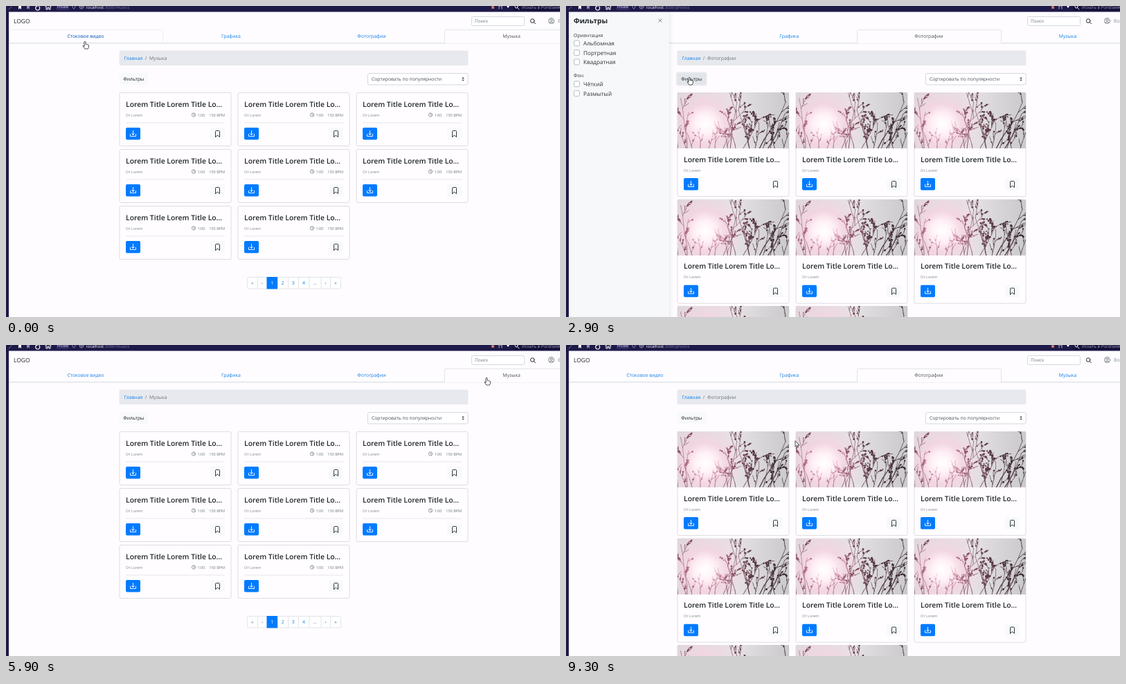
An HTML page with a canvas for the animation above (9.4 s loop, 800 by 450 pixels).

```html
<!DOCTYPE html>
<html lang="ru">
<head>
<meta charset="utf-8">
<style>
html, body { margin: 0; width: 100%; height: 100%; overflow: hidden; background: #fefcff; }
canvas { display: block; width: 800px; height: 450px; }
</style>
</head>
<body>
<canvas id="stage" width="800" height="450"></canvas>
<script>
const LOOP = 9400, STEP = 100;
const BLUE = '#007bff', INK = '#212529', GRAY = '#6c757d', LINE = '#e2e4e9', BODY = 6.86;
const ctx = document.getElementById('stage').getContext('2d');
ctx.textRendering = 'geometricPrecision';

const PAGES = {
  music: { tab: 3, url: 'musics', name: 'Музыка', edges: [4, 226, 423, 633, 827] },
  graphics: { tab: 1, url: 'graphics', name: 'Графика', edges: [4, 225, 420, 628, 821] },
  photos: { tab: 2, url: 'photos', name: 'Фотографии', edges: [4, 225, 420, 628, 821] }
};
const VISITS = [[0, 'music'], [700, 'graphics'], [1800, 'photos'], [5800, 'music'], [7800, 'photos']];
const TABS = ['Стоковое видео', 'Графика', 'Фотографии', 'Музыка'];

// Pointer tip: time, x, y
const POINTER = [
  [0, 114, 51], [100, 114, 51], [600, 322, 44], [1000, 322, 44], [1600, 492, 41], [1700, 505, 45],
  [1900, 505, 45], [2400, 178, 103], [2900, 178, 103], [3400, 32, 54], [3800, 32, 54], [4000, 40, 66],
  [4200, 32, 54], [4400, 32, 54], [4900, 178, 103], [5000, 180, 104], [5100, 236, 106], [5500, 690, 47],
  [5900, 694, 47], [6300, 560, 250], [6600, 400, 400], [6700, 400, 400], [7000, 600, 104],
  [7200, 600, 104], [7500, 532, 45], [7800, 532, 45], [8500, 480, 330], [8900, 300, 300], [9300, 331, 139]
];

function box(x, y, w, h, r, fill, stroke) {
  ctx.beginPath();
  ctx.roundRect(x, y, w, h, r);
  if (fill) { ctx.fillStyle = fill; ctx.fill(); }
  if (stroke) { ctx.strokeStyle = stroke; ctx.lineWidth = 1; ctx.stroke(); }
}

// y is the middle of the capitals
function text(s, x, y, size, color, align = 'left', weight = 400) {
  ctx.font = `${weight} ${size}px "Open Sans", "Noto Sans", sans-serif`;
  ctx.textAlign = align;
  ctx.fillStyle = color;
  ctx.fillText(s, x, y + size * .36);
}

function icon(d, x, y, stroke, width = 1, fill) {
  const path = new Path2D(d);
  ctx.save();
  ctx.translate(x, y);
  ctx.lineWidth = width;
  ctx.lineCap = ctx.lineJoin = 'round';
  if (fill) { ctx.fillStyle = fill; ctx.fill(path); }
  if (stroke) { ctx.strokeStyle = stroke; ctx.stroke(path); }
  ctx.restore();
}

function makePhoto() {
  const photo = document.createElement('canvas');
  photo.width = 161; photo.height = 81;
  const c = photo.getContext('2d');
  let seed = 11;
  const rnd = () => (seed = seed * 16807 % 2147483647) / 2147483647;
  const radial = (r, ...stops) => {
    const g = c.createRadialGradient(40, 46, 0, 40, 46, r);
    stops.forEach(([at, color]) => g.addColorStop(at, color));
    return g;
  };
  const paint = fill => { c.fillStyle = fill; c.fillRect(0, 0, 161, 81); };
  const sky = c.createLinearGradient(0, 0, 161, 0);
  sky.addColorStop(0, '#dfd6db'); sky.addColorStop(.5, '#e6e2e5'); sky.addColorStop(1, '#cbc9cc');
  paint(sky);
  paint(radial(60, [0, '#fff'], [.25, '#fff2f7'], [.5, 'rgba(247,212,226,.75)'], [1, 'rgba(240,215,225,0)']));

  const bark = radial(115, [0, '#eea9c1'], [.2, '#b8708a'], [.4, '#7d4b5b'], [.65, '#50343e'], [1, '#35282e']);
  c.strokeStyle = c.fillStyle = bark;
  c.lineCap = 'round';
  function twig(x, y, angle, length, width) {
    for (let i = 0; i < 5; i++) {
      const nx = x + Math.cos(angle) * length / 5, ny = y + Math.sin(angle) * length / 5;
      c.lineWidth = Math.max(.55, width * (1 - i * .12));
      c.beginPath(); c.moveTo(x, y); c.lineTo(nx, ny); c.stroke();
      x = nx; y = ny;
      angle += (rnd() - .5) * .3;
      if (length > 14 && rnd() < .55)
        twig(x, y, angle + (rnd() < .5 ? -1 : 1) * (.4 + rnd() * .4), length * (.25 + rnd() * .2), width * .7);
      if (length < 20 && rnd() < .4) {
        c.beginPath();
        c.arc(x + rnd() * 2 - 1, y + rnd() * 2 - 1, .7 + rnd() * .8, 0, 7);
        c.fill();
      }
    }
  }
  for (let i = 0; i < 17; i++)
    twig(i * 10 + rnd() * 5, 84, -1.57 + (rnd() - .4) * .9, 24 + rnd() * 24, .8);
  twig(14, 82, -1.6, 74, .8);
  twig(76, 82, -1.45, 68, .9);
  twig(104, 82, -1.75, 58, .9);
  twig(118, 82, -1.1, 78, 1.2);
  twig(130, 82, -1, 56, 1.1);
  paint(radial(26, [0, 'rgba(255,255,255,.95)'], [.4, 'rgba(255,246,250,.65)'], [1, 'rgba(255,220,233,0)']));
  return photo;
}
const photo = makePhoto();

// CSS "ease" curve
function ease(p) {
  if (p <= 0 || p >= 1) return p <= 0 ? 0 : 1;
  let lo = 0, hi = 1, s;
  for (let i = 0; i < 20; i++) {
    s = (lo + hi) / 2;
    if (.75 * s * (1 - s) + s ** 3 < p) lo = s; else hi = s;
  }
  return .3 * s * (1 - s) ** 2 + 3 * s * s * (1 - s) + s ** 3;
}

function pointerAt(t) {
  const i = Math.max(1, POINTER.findIndex(k => k[0] >= t));
  const [t0, x0, y0] = POINTER[i - 1], [t1, x1, y1] = POINTER[i];
  const p = (t - t0) / (t1 - t0), q = p * p * (3 - 2 * p);
  return [x0 + (x1 - x0) * q, y0 + (y1 - y0) * q];
}

function drawBrowser(url) {
  box(0, 0, 800, 8.5, 0, '#1e1a48');
  box(0, 0, 4, 450, 0, '#1c1945');
  box(73, -5, 18, 11, 1, '#302b60');
  box(732, -5, 80, 12, 1, '#151238');
  text('Private', 82, 1.3, 5, '#e4e2f2', 'center');
  icon('M-3 4L1 0', 7, 1, '#7774a0');
  icon('M-2 -3V4L0 2L2 4V-3Z', 20, 1, null, 1, '#fff');
  icon('M-2 -3V4L0 2L2 4V-3Z', 32, 1, null, 1, '#8e8bb4');
  icon('M3 -1A3 3 0 1 1 1 -2', 45, 2, '#fff', 1.2);
  icon('M-3 0V4H-1V1H1V4H3V0M-4 0L0 -3L4 0', 61, 1, '#fff');
  icon('M-2 -2V1Q-2 3 0 4Q2 3 2 1V-2Z', 98, 0, '#aaa7c8', .8);
  icon('M3 0A3 3 0 1 1 -3 0A3 3 0 1 1 3 0M-3 0H3M0 -3V3', 109, 1, '#aaa7c8', .7);
  text('localhost', 116, 1.5, 6, '#fff');
  text(':3000/' + url, 116 + ctx.measureText('localhost').width, 1.5, 6, '#817eaa');
  box(701, 0, 4, 4, 1, '#c67268');
  icon('M-2 4V0H2V4', 714, 0, '#cac8e0', .9);
  icon('M-2 0L0 3L2 0Z', 725, 0, null, 1, '#fff');
  icon('M2 0A2 2 0 1 1 -2 0A2 2 0 1 1 2 0M1.5 1.5L4 4', 737, 1, '#fff', .9);
  text('Искать в PondSeeker', 745, 1.5, 6.2, '#a19eba');
}

function drawHeader(page, hovered) {
  const dx = page.tab === 3 ? 0 : -6, e = page.edges;
  text('LOGO', 11, 22, 8.5, INK);
  box(672.5 + dx, 15.5, 76, 13, 2, '#fff', '#d3d8de');
  text('Поиск', 677 + dx, 22, 6.5, GRAY);
  icon('M2.5 0A2.8 2.8 0 1 1 -3.1 0A2.8 2.8 0 1 1 2.5 0M1.8 2L4 4.2', 760.5 + dx, 21.5, INK);
  icon('M4 0A4 4 0 1 1 -4 0A4 4 0 1 1 4 0M1.5 -1A1.5 1.5 0 1 1 -1.5 -1A1.5 1.5 0 1 1 1.5 -1M-2.8 2.8Q0 .3 2.8 2.8', 787.5 + dx, 21.5, GRAY, .9);
  text('Войти', 797 + dx, 22, BODY, '#8a8f95');

  box(4, 54, 796, 1, 0, '#f1f0f4');
  box(4, 53, 796, 1, 0, LINE);
  TABS.forEach((name, i) => {
    const active = i === page.tab;
    if (active || i === hovered) {
      icon(`M0 19V2Q0 0 2 0H${e[i + 1] - e[i] - 2}q2 0 2 2V19`, e[i] + .5, 34.5, active ? LINE : '#eeeff3');
      if (active) box(e[i] + 1, 53, e[i + 1] - e[i] - 1, 1, 0, '#fefcff');
    }
    const color = active ? '#495057' : i === hovered ? '#0056b3' : '#1680ea';
    text(name, [115, 325, 528, 730][i] - (dx && [1, 2.5, 4, 5.5][i]), 44, BODY, color, 'center');
  });
}

function drawToolbar(page, dx, filter, focused) {
  box(163.5 + dx, 64.5, 504, 21.5, 2, '#e7e9ee');
  text('Главная', 170.5 + dx, 75.5, BODY, '#1680ea');
  text('/', 202 + dx, 75.5, BODY, GRAY, 'center');
  text(page.name, 207 + dx, 75.5, BODY, GRAY);
  if (filter === 2) box(162 + dx, 95.5, 44.5, 20, 3, 'rgba(216,217,219,.5)');
  box(163.5 + dx, 97, 41.5, 17, 2, filter ? '#e2e6ea' : '#f8f9fa');
  text('Фильтры', 184.3 + dx, 105.7, BODY, INK, 'center');
  if (focused) box(520.5 + dx, 95.5, 148.5, 20, 3, '#bfdeff');
  box(522.5 + dx, 97.5, 144.5, 16.5, 2, '#fff', focused ? '#80bdff' : '#d3d8de');
  text('Сортировать по популярности', 528 + dx, 105.7, BODY - .1, '#495057');
  icon('M-1.8 -.7L0 -2.8L1.8 -.7ZM-1.8 .7L0 2.8L1.8 .7Z', 660 + dx, 105.7, null, 1, '#343a40');
}

function drawCard(x, y, withPhoto) {
  const h = withPhoto ? 150.5 : 77.5, foot = y + h - 26.5;
  box(x + .5, y + .5, 161, h - .5, 2, '#fffdff', '#dedde1');
  if (withPhoto) ctx.drawImage(photo, Math.round(x + .5), Math.round(y));
  const top = withPhoto ? y + 97 : y + 17;
  text('Lorem Title Lorem Title Lo…', x + 9.5, top, 10.4, INK, 'left', 600);
  text('От Lorem', x + 9.5, top + 15.7, 5.4, '#7d848b');
  if (!withPhoto) {
    icon('M2.7 0A2.7 2.7 0 1 1 -2.7 0A2.7 2.7 0 1 1 2.7 0M0 -1.6V.2L1.2 .9', x + 107.5, top + 15.5, GRAY, .7);
    text('1:00', x + 113, top + 15.7, 5.5, GRAY);
    text('150 BPM', x + 152.5, top + 15.7, 5.5, GRAY, 'right');
    box(x + 9.5, y + 43.5, 143, 1, 0, '#e7e6e9');
  }
  box(x + 9.5, foot, 21, 17.5, 2, BLUE);
  icon('M-4 1V4H4V1M0 -4V2M-2 0L0 2L2 0', x + 20, foot + 8.5, '#fff', .9);
  box(x + 131.5, foot, 21, 17.5, 2, '#f8f9fa');
  icon('M-3 4.5V-3.5Q-3 -4.5 -2 -4.5H2Q3 -4.5 3 -3.5V4.5L0 2.2Z', x + 142, foot + 9, INK, .9);
}

function drawPagination() {
  const edges = [348, 363, 376.5, 392, 407, 422, 437.5, 454.5, 468, 483.5];
  box(348.5, 392.5, 135, 16.5, 2, '#fff', LINE);
  [...'«‹1234…›»'].forEach((label, i) => {
    const x = edges[i], w = edges[i + 1] - x, active = i === 2;
    if (i) box(x, 392.5, 1, 16.5, 0, LINE);
    if (active) box(x, 392, w, 17.5, 0, BLUE);
    const muted = i < 2 || i === 6;
    text(label, x + w / 2 + .3, 400.7, BODY, active ? '#fff' : muted ? GRAY : '#1680ea', 'center');
  });
}

function drawSidebar(shift, t) {
  const x = 4 - shift, checked = t >= 3700 && t < 4300, ringed = t >= 3700 && t < 5000;
  ctx.save();
  ctx.shadowColor = 'rgba(0,0,0,.13)';
  ctx.shadowBlur = 7;
  box(x, 8, 145, 450, 0, '#f6f8f9');
  ctx.restore();
  text('Фильтры', x + 7, 21.5, 10.2, INK, 'left', 700);
  icon('M-2.2 -2.2L2.2 2.2M2.2 -2.2L-2.2 2.2', x + 132, 21, '#7b7f83', .9);
  text('Ориентация', x + 7, 42, 7, '#343a40');
  text('Фон', x + 7, 100.7, 7, '#343a40');
  ['Альбомная', 'Портретная', 'Квадратная', 'Чёткий', 'Размытый'].forEach((label, i) => {
    const y = [54.3, 68, 81.5, 113.3, 127][i], on = checked && !i;
    if (ringed && !i) box(x + 5.5, y - 6.5, 12, 12, 3, '#bfdeff');
    box(x + 7.5, y - 4.5, 8, 8, 2, on ? BLUE : '#fff', on ? BLUE : '#b6bdc4');
    if (on) icon('M-2 0L-.5 1.5L2 -1.5', x + 11.5, y - .5, '#fff', 1.2);
    text(label, x + 21, y, 8.2, '#2f3438');
  });
}

function drawPointer(x, y, hand) {
  if (hand) icon('M-1 1Q0 -1 1 1V4.5Q2 3.8 2.6 4.8Q3.6 4.2 4.2 5.2Q5.3 4.8 5.4 6V8Q5.2 9.6 4.3 11H-.2Q-1.8 8.8 -3 6.8Q-2.4 5.3 -1 7Z', x, y, '#222', .8, '#fff');
  else icon('M0 0V8.2L1.9 6.5L3.2 9.3L4.4 8.8L3.2 6H5.6Z', x, y, '#222', .8, '#fff');
}

function draw(t) {
  const page = PAGES[VISITS.filter(v => v[0] <= t).pop()[1]];
  const music = page.tab === 3, dx = music ? 0 : -3;
  const [px, py] = pointerAt(t);
  const inTabs = py > 35 && py < 54;
  const hovered = inTabs ? page.edges.findIndex((e, i) => px >= e && px < page.edges[i + 1]) : -1;
  const onFilter = px > 160 && px < 206 && py > 96 && py < 115;
  const onPages = music && px > 348 && px < 484 && py > 392 && py < 410;

  box(0, 0, 800, 450, 0, '#fefcff');
  drawHeader(page, hovered);
  drawToolbar(page, dx, t >= 2600 && t < 5800 ? 2 : +onFilter, t >= 7000 && t < 7800);
  for (let i = 0; i < 8; i++)
    drawCard(163.5 + dx + i % 3 * 171, 125 + (i / 3 | 0) * (music ? 82 : 154.7), !music);
  if (music) drawPagination();

  const shift = 145 * (1 - ease((t - 2600) / 300) + ease((t - 5070) / 300));
  if (shift < 144.9) drawSidebar(shift, t);
  drawBrowser(page.url);
  drawPointer(px, py, inTabs || onFilter || onPages);
}

function frame(now) {
  draw(Math.floor(now % LOOP / STEP) * STEP);
  requestAnimationFrame(frame);
}
requestAnimationFrame(frame);
</script>
</body>
</html>
```
